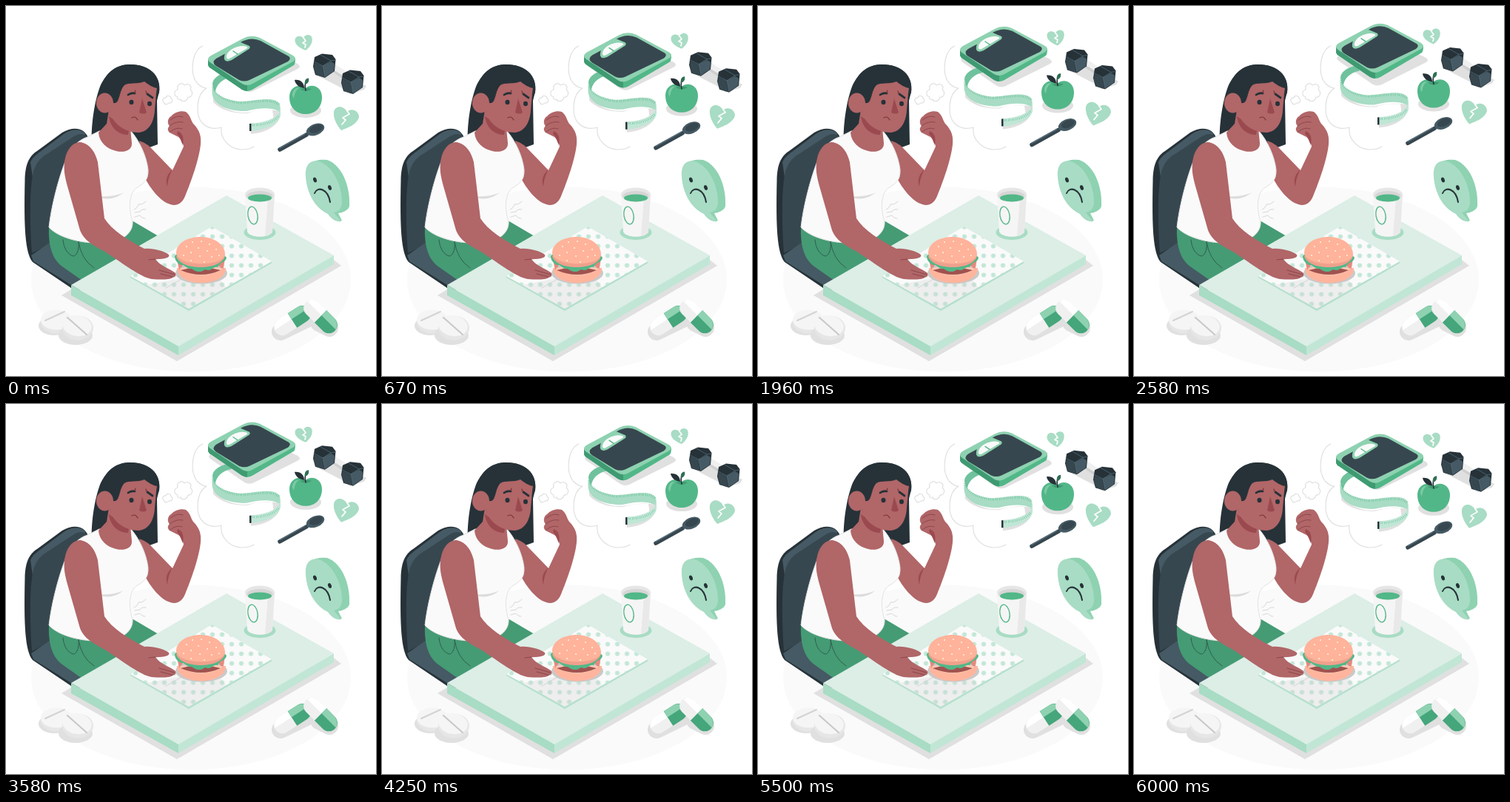
Recreate the animation shown at these times as an HTML page. Size 500x500 px, loop 6.04 s.

```html
<!DOCTYPE html>
<html lang="en">
<head>
<meta charset="utf-8">
<title>Worried meal</title>
<style>
html, body { margin: 0; width: 100%; height: 100%; overflow: hidden; background: #fff; }
svg { display: block; width: 100%; height: 100%; }
.line { fill: none; stroke-linecap: round; stroke-linejoin: round; }
.flat { stroke-linecap: butt; }
.ink { fill: #263238; } .slate { fill: #37474f; } .steel { fill: #455a64; }
.green { fill: #52b788; } .mint { fill: #8ed2b1; } .pale { fill: #a8dcc4; }
.skin { fill: #b16668; } .blush { fill: #9a4a4f; } .shade { fill: #e0e0e0; } .white { fill: #fafafa; }
</style>
</head>
<body>
<svg viewBox="0 0 500 500">
<defs>
  <pattern id="dots" width="13" height="13" patternUnits="userSpaceOnUse" x="-.5" y="6">
    <circle cx="6.500" cy="6.500" r="3.100" fill="#c3e6d7"/>
  </pattern>
  <g id="weight">
    <path class="ink" d="M415 82 417 69 427 64.500 441 66 445.500 72 444 88 431 97 418 93Z"/>
    <path class="slate" d="M417 77 427 81 430 96 419 93 416 83Z"/>
    <path class="steel" d="M428 81 439 75 444 78 443 88 431 96Z"/>
    <path class="line" stroke="#607d8b" stroke-width=".6" d="M416 75 428 81 439 74 445 73M428 81 431 96M425 66 439 74"/>
  </g>
  <g id="capsule">
    <path fill="#f0f0f0" d="M1-11.500H-16A11.500 11.500 0 0 0-16 11.500H1Z"/>
    <path fill="#fff" d="M1-11.500H-16Q-25-10-27-2H1Z"/>
    <path fill="#45a67b" d="M0-11.500H16A11.500 11.500 0 0 1 16 11.500H0Z"/>
    <path class="mint" d="M0-11.500H16Q25-10 27-2H0Z"/>
  </g>
</defs>

<ellipse cx="250" cy="369.500" rx="216" ry="125" fill="#fafafa"/>

<!-- chair -->
<path class="ink" d="M36 346C26 334 24 300 25.500 235C26 214 31 203 42 196L76 171C92 162 106 165 111 178L100 384 88 381Z"/>
<path class="steel" d="M33 211C36 204 43 199 50 194L78 173C91 165 102 166 108 173L48 208 36 232Z"/>
<path class="slate" d="M35 334C32 290 32 250 36 229C39 212 47 205 57 199L92 176C101 171 107 172 112 179L110 310 66 318Z"/>
<path class="steel" d="M34 337 63 317 140 347 97 375 88 377 37 345Z"/>

<!-- hair behind, raised arm -->
<path class="ink" d="M116 196C114 160 120 128 127 109C136 89 150 79 168 79C194 79 210 94 207 116L204 128 205 187 186 194 120 200Z"/>
<path class="skin" d="M180 182C188 185 193 188 198 194L225 222 240 190C239 184 237 180 233 177L221 171C218 168 218 165 221 162C217 158 219 151 223 149C228 143 237 141 243 143C249 147 250 155 253 159C262 168 264 176 263 187C261 207 250 238 242 257C238 267 230 271 222 268C208 264 195 246 188 233Z"/>
<path class="blush" d="M225 221C218 227 215 234 218 244C219 234 221 228 225 221ZM232 169C238 171 241 177 239 188C236 181 234 175 231 173Z"/>
<path class="line" stroke="#8c4549" stroke-width=".9" d="M222 154Q231 147 239 150M221 162Q230 155 239 157M222 170Q230 163 238 166"/>

<!-- trousers, top -->
<path fill="#459b74" d="M58 299C57 322 62 342 76 352L103 371 206 311 172 291 110 298Z"/>
<path class="line" stroke="#2f5f50" stroke-width="1" d="M77 316C78 328 84 337 92 338C97 335 99 328 98 318M98 318Q101 342 119 354"/>
<path class="white" stroke="#e3e3e3" stroke-width="1" d="M58 299C61 272 70 236 80 210C87 192 96 182 110 177L126 169 168 168C180 181 190 203 192 221C193 237 184 241 176 246C165 255 166 276 171 291C172 303 163 313 148 318C114 325 72 315 58 299Z"/>
<path fill="#dcdcdc" d="M122 257Q142 266 159 252Q145 259 122 257Z"/>
<path class="line" stroke="#d8d8d8" stroke-width="1" d="M189 264Q184 269 179 268Q177 274 173 275M189 275Q183 274 181 278L174 279M188 287Q183 287 181 283L174 285"/>

<!-- head -->
<path class="skin" d="M139 140 136 159 125 171C126 184 136 193 149 196C161 199 171 194 170 185L168 165Z"/>
<path class="blush" d="M139 149C141 164 151 174 165 174L166 168Z"/>
<path class="ink" d="M125 118C132 92 146 79 168 79C193 79 210 94 207 117L204 123 140 140Z"/>
<ellipse class="skin" cx="133.500" cy="131" rx="11.500" ry="13.500"/>
<path class="skin" d="M140 124 141 145C145 159 161 171 179 171C193 170 200 157 201 141L203 118 204 111C198 110 192 106 187 102C178 106 166 103 160 107C153 114 154 129 148 131C143 132 142 128 140 124Z"/>
<path class="blush" d="M184 125 180 144Q186 147 190 144Z"/>
<g class="ink"><ellipse cx="169.500" cy="130" rx="3" ry="3.200"/><ellipse cx="194" cy="132" rx="3" ry="3.200"/></g>
<path class="line" stroke="#263238" stroke-width="2.800" d="M165 120Q169 117 174 118M191 119 198 124"/>
<path class="line" stroke="#7c3438" stroke-width="1.200" d="M170 151Q175 148 178 154M175 114 174 117M189 115 190 118"/>

<!-- table -->
<path class="shade" d="M75 391 88 383 233 462 443 343 453 351 231 480Z"/>
<path fill="#a8dcc4" d="M88 377 233 459 233 472 88 391Z"/>
<path fill="#c1e6d6" d="M233 459 443 337 443 349 233 472Z"/>
<path fill="#dceee6" d="M88 377 298 256 443 337 233 460Z"/>
<path fill="#b5dfcd" d="M168 365 247 408 359 345 359 347.500 247 412 168 367Z"/>
<path class="white" d="M168 365 278 298 359 345 247 409Z"/>
<path fill="url(#dots)" d="M168 365 278 298 359 345 247 409Z"/>
<path fill="#d0d0d0" opacity=".3" d="M190 377 241 367 290 370 297 380 247 409Z"/>
<path class="line" stroke="#d5d5d5" stroke-width="1" d="M216 381 241 367"/>

<!-- burger -->
<ellipse cx="264" cy="361" rx="35" ry="14.500" fill="#c9c9c9"/>
<path fill="#ffb59d" d="M231 354C231 381 297 381 297 354Z"/>
<path fill="#e9877b" d="M231 342H296L293 357 286 349H240L234 357Z"/>
<path fill="#ffc9b5" d="M234 355Q263 346 294 355Q264 373 234 355Z"/>
<path fill="#a0524f" d="M236 357 262 351 290 357Q264 369 236 357Z"/>
<path class="green" d="M228 338C231 331 295 331 298 340C297 347 290 345 286 353C280 351 277 360 269 356C261 362 255 358 251 355C245 357 241 348 236 350C231 347 228 343 228 338Z"/>
<path fill="#efa08c" d="M230 338C236 358 290 358 296 338Z"/>
<path fill="#ffb39b" d="M230 335C229 321 245 312 263 312C281 312 296 322 296 336C294 352 235 353 230 335Z"/>
<path class="line" stroke="#fff0dc" stroke-width="2" d="M244 325h.1M252 319h.1M264 318h.1M275 322h.1M284 329h.1M272 331h.1M260 327h.1M250 333h.1M240 337h.1M262 338h.1M278 339h.1M288 337h.1M268 346h.1M250 344h.1"/>

<!-- resting arm -->
<path class="skin" d="M79 212C81 194 90 184 101 184C115 187 121 199 124 211L133 287C143 303 164 316 187 328C199 327 213 331 220 336C222 340 215 342 202 342C208 351 221 355 228 360C231 363 229 366 225 367C221 370 210 370 197 369C181 366 160 349 132 331C113 321 105 315 100 303L82 240C79 228 78 221 79 212Z"/>
<path class="line" stroke="#8c4549" stroke-width="1" d="M209 362 225 366M207 357 228 363M193 343 202 342"/>

<!-- cup -->
<ellipse class="pale" cx="343" cy="306" rx="21.500" ry="10"/>
<path fill="#f5f5f5" d="M323 254 326 305C329 314 357 314 360 305L363 254Z"/>
<path fill="#e9e9e9" d="M354 259 363 254 360 305Q357 310 350 311Z"/>
<ellipse cx="343" cy="255" rx="20" ry="9.500" fill="#e6e6e6"/>
<ellipse cx="343" cy="257" rx="17.500" ry="7" fill="#d5d5d5"/>
<ellipse class="green" cx="343" cy="259.500" rx="16" ry="5"/>
<ellipse class="line" cx="333.500" cy="283" rx="6.500" ry="12" transform="rotate(-10 333.500 283)" stroke="#52b788" stroke-width="1.400"/>

<!-- tablets -->
<ellipse class="shade" cx="65" cy="432" rx="21" ry="13"/>
<ellipse cx="68" cy="428" rx="21" ry="14.500" fill="#e6e6e6"/>
<ellipse cx="68" cy="424" rx="21" ry="13.500" fill="#f5f5f5"/>
<path class="line" stroke="#d3d3d3" stroke-width="2" d="M53 425 79 413"/>
<ellipse class="shade" cx="94" cy="445" rx="23" ry="13"/>
<ellipse cx="97" cy="435" rx="21" ry="16.500" fill="#e6e6e6"/>
<ellipse cx="96" cy="432" rx="20" ry="14" fill="#f5f5f5" transform="rotate(10 96 432)"/>
<path class="line" stroke="#c9c9c9" stroke-width="2.200" d="M83 421 109 444"/>

<!-- capsules -->
<path class="line" stroke="#e0e0e0" stroke-width="24" d="M371 440 404 424M423 428 437 435"/>
<use href="#capsule" transform="translate(387 425) rotate(-33)"/>
<use href="#capsule" transform="translate(425 419.500) rotate(45)"/>

<!-- sad speech bubble -->
<path class="mint" d="M405 230C405 212 418 206 434 208C453 214 466 243 464 271C462 276 456 279 449 280L454 290C445 293 440 287 437 282Z"/>
<path class="pale" d="M405 230C404 212 413 208 423 210C441 216 455 242 454 267C453 275 449 278 443 279L453 291.500C444 291 439 287 435 281C417 273 406 251 405 230Z"/>
<g class="ink"><ellipse cx="417.500" cy="235" rx="2.300" ry="3.500" transform="rotate(-20 417.500 235)"/><ellipse cx="437.500" cy="245.500" rx="2.300" ry="3.500" transform="rotate(-20 437.500 245.500)"/></g>
<path class="line" stroke="#263238" stroke-width="2" d="M417 253C421 243 435 247 438 265"/>

<!-- thought clouds -->
<g class="line" stroke="#e0e0e0" stroke-width="1.200">
  <path d="M214 131C210 128 212 123 216 124C217 120 223 121 223 125C227 127 224 132 220 131C218 134 214 133 214 131Z"/>
  <path d="M232 123C226 121 227 114 232 113C230 106 238 102 241 107C247 103 252 109 249 113C254 117 251 124 246 123C244 130 237 130 236 126C233 127 231 126 232 123Z"/>
  <path d="M266 54C251 60 248 91 258 104C262 108 266 111 271 111C257 119 255 148 266 159C272 165 282 167 291 164C289 180 302 193 318 194C325 194 331 193 335 190"/>
</g>

<!-- floating thoughts -->
<g data-lift="10">
  <g class="pale">
    <path d="M405 60C397 57 390 52 390.500 46C391 40 399 39 402 44C403 38 412 37 413.500 43C415 50 410 56 405 60Z"/>
    <path d="M453 168C446 160 442 150 443 143C445 134 456 134 461 143C467 137 477 142 477 150C475 160 461 165 453 168Z"/>
  </g>
  <path class="line" stroke="#fff" stroke-width="1.700" d="M402 43 405 47 401 50 405 52 404 56M461 142 464 146 455 151 459 154 454 160"/>

  <g class="shade">
    <path d="M277 83Q271 79 278 75L325 52Q331 49 337 52L394 78Q400 82 394 85L336 114Q329 118 322 114Z"/>
    <ellipse cx="405" cy="141" rx="21" ry="10"/>
    <path d="M417 92 430 85 487 108 484 113 465 119 454 111Z"/>
    <path d="M280 123Q295 145 325 144Q354 138 370 142L369 153Q360 170 331 173L331 168 362 155 360 141Q340 140 326 145Q296 146 280 130Z"/>
  </g>

  <!-- measuring tape -->
  <path fill="#6fc29d" d="M279 106C279 98 287 92 300 89L305 96C291 99 284 106 282 119Z"/>
  <path class="pale" d="M278.500 106C279 119 298 128 317 129C338 128 362 121 370 132V143C358 136 341 138 325 142C300 143 278 133 278.500 116Z"/>
  <path fill="#c0e6d6" d="M371 132V148C368 162 348 168 330 169V158.500C347 158 362 154 369 144Z"/>
  <path class="line flat" stroke="#52b788" stroke-width="3" stroke-dasharray=".5 2" d="M280 109C282 122 300 130 318 131C338 130 360 124 369 134M368 149C361 158 346 161 332 161"/>
  <path class="ink" d="M329 159H331.500V169H329Z"/>

  <!-- dumbbell -->
  <path class="line flat" stroke="#cfcfcf" stroke-width="10" d="M438 81 461 96"/>
  <path class="line flat" stroke="#f0f0f0" stroke-width="7" d="M439 80 462 94"/>
  <use href="#weight"/><use href="#weight" x="38" y="22"/>

  <!-- apple -->
  <path class="green" d="M405 111C413 104 427 109 427 123C427 138 417 146 405 146C393 146 383 138 383 123C383 109 397 104 405 111Z"/>
  <path fill="#7ccaa5" d="M387 121C387 114 391 110 396 111C391 114 390 119 389 125Z"/>
  <path fill="#3f9a72" d="M397 112Q405 118 413 112Q406 110 397 112Z"/>
  <path class="line" stroke="#263238" stroke-width="1.600" d="M405 114Q403 106 406 100"/>
  <path class="ink" d="M403 111C396 110 391 106 390 100C398 99 403 104 403 111Z"/>
  <path fill="#2f6f55" d="M404 106C403 101 405 98 409 97.500C410 102 408 105 404 106Z"/>

  <!-- spoon -->
  <path class="line" stroke="#37474f" stroke-width="5.500" d="M370 194 406 174"/>
  <path class="line" stroke="#607d8b" stroke-width="1" d="M370 192 404 173"/>
  <ellipse class="steel" cx="418" cy="167" rx="12.800" ry="7.500" transform="rotate(-22 418 167)"/>
  <ellipse class="slate" cx="419" cy="166" rx="9.500" ry="5" transform="rotate(-22 419 166)"/>
</g>

<!-- bathroom scale -->
<g data-lift="20">
  <path class="green" d="M273 72V80Q274 83 278 85L319 113Q326 117 333 113L389 80Q391 78 391 71Z"/>
  <path fill="#3f9a72" d="M273 72V80Q274 83 278 85L319 113Q323 115 326 115V107Z"/>
  <path class="mint" d="M277 77Q269 72 277 67L320 44Q331 38 343 43L388 67Q394 71 388 75L333 105Q326 109 319 105Z"/>
  <path class="slate" d="M317 49Q331 41 344 47L382 68Q386 71 381 75L329 100Q322 103 315 100L284 81Q277 76 284 71L297 64Z"/>
  <path class="mint" d="M295 72C294 61 304 51 317 49L329 54Q331 57 327 59L305 73Q297 77 295 72Z"/>
  <path class="white" d="M298 70C297 62 308 54 321 54Q328 55 326 57L304 70Q299 73 298 70Z"/>
  <path class="line" stroke="#52b788" stroke-width="1.400" d="M307 61 313 65"/>
</g>
</svg>
<script>
const LOOP = 6040;
const floats = document.querySelectorAll("[data-lift]");
const start = performance.now();

// Steady rise for half the loop, steady fall for the other half.
function draw(now) {
  const rise = 1 - Math.abs(2 * (now % LOOP) / LOOP - 1);
  for (const item of floats)
    item.setAttribute("transform", `translate(0 ${-item.dataset.lift * rise})`);
  requestAnimationFrame(time => draw(Math.max(0, time - start)));
}
draw(0);
</script>
</body>
</html>
```
